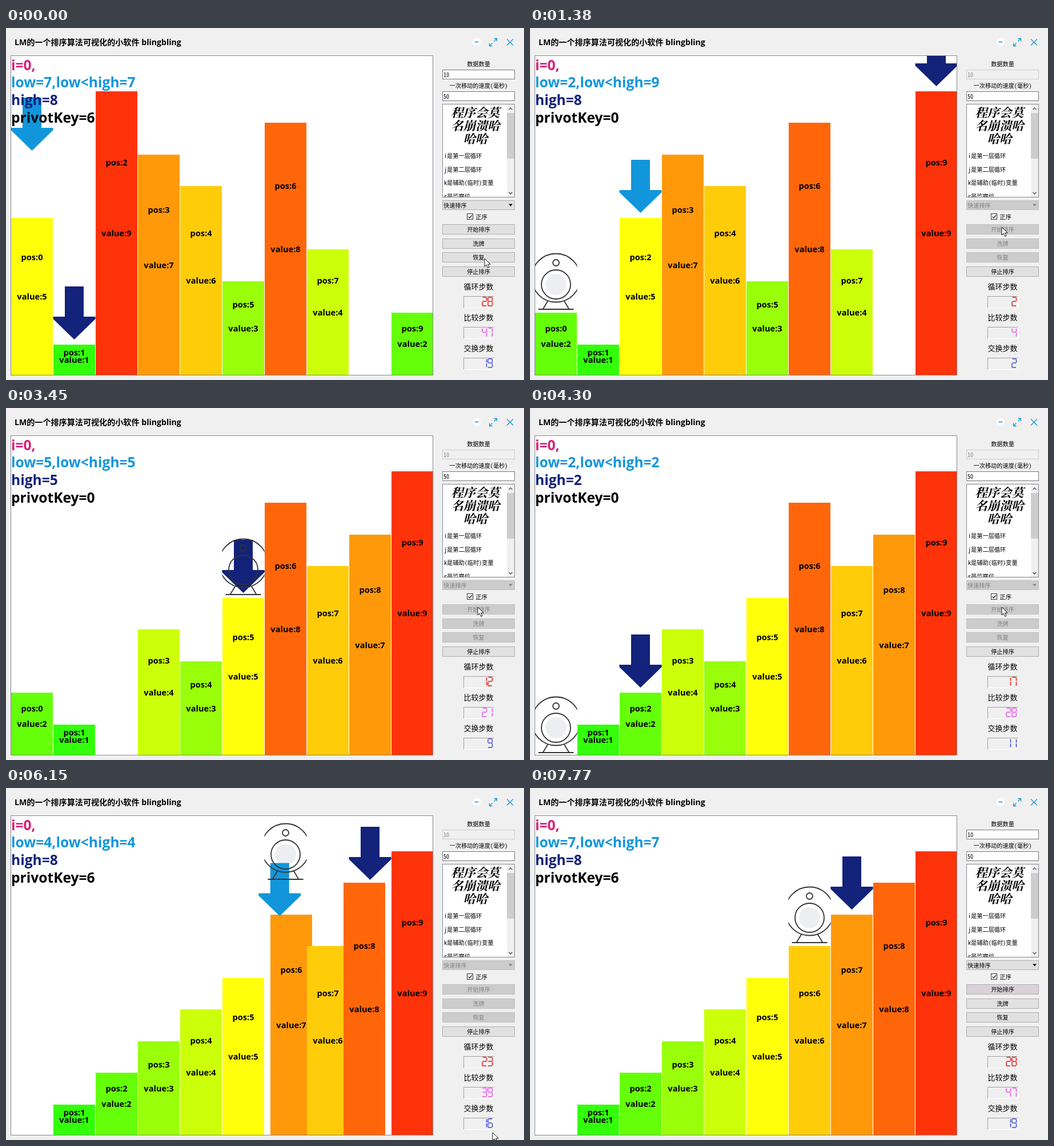
These frames come from a looping animation (907 px wide and 617 px high, 8.23 s). An HTML page:

```html
<!DOCTYPE html>
<html lang="zh">
<head>
<meta charset="utf-8">
<style>
html, body { margin: 0; width: 100%; height: 100%; overflow: hidden; background: #f0f0f0; }
svg { display: block; width: 907px; height: 617px; }
text { white-space: pre; }
.ui { font: 10.2px "Noto Sans Mono CJK SC", "Noto Sans CJK SC", "Noto Sans CJK", sans-serif; }
.big { font: bold 24.6px "Open Sans", "Noto Sans", sans-serif; }
.lab { font: bold 14.6px "Open Sans", "Noto Sans", sans-serif; text-anchor: middle; }
.title { font: bold 14.1px "Open Sans", "Noto Sans CJK SC", "Noto Sans CJK", sans-serif; }
.note { font: italic 600 21.3px "Noto Serif CJK SC", "Noto Sans CJK SC", "Noto Sans CJK", serif; }
.mid { text-anchor: middle; }
.step { font-size: 13px; }
</style>
</head>
<body>
<svg id="stage" viewBox="0 0 907 617"></svg>
<script>
(() => {
const LOOP = 8230, MOVE = 130, START = 600, DONE = 7530, HOVER = 7770;
const DATA = [5, 1, 9, 7, 6, 3, 8, 4, 0, 2];

// time, action, arguments: p pivot, z zero counts, s swap, l low, h high,
// o outer pass, c camera, n extra counts
const STEPS = [
  [START, 'p', 0], [START, 'z'],
  [788, 's', 0, 9], [936, 'l', 1, 9], [1084, 'l', 2, 9], [1232, 's', 2, 9],
  [1385, 'o'], [1385, 'h', 8], [1515, 's', 2, 8], [1700, 'l', 3, 8], [1840, 's', 3, 8],
  [1985, 'o'], [1985, 'h', 7], [2136, 's', 3, 7], [2290, 'l', 4, 7], [2440, 's', 4, 7],
  [2590, 'o'], [2590, 'h', 6], [2735, 'h', 5], [2885, 's', 4, 5], [3165, 'l', 5, 5],
  [3297, 's', 5, 5], [3445, 'c', 5], [3445, 'n', 0, 1],
  [3460, 'p', 0], [3460, 'h', 3], [3605, 'h', 2], [3755, 's', 0, 2],
  [3905, 'l', 1, 2], [4055, 'l', 2, 2], [4290, 's', 2, 2], [4440, 'c', 2],
  [4590, 'p', 0], [4590, 'h', 0], [4740, 's', 0, 0], [4890, 's', 0, 0],
  [5120, 'p', 3], [5284, 's', 3, 4], [5430, 'l', 4, 4], [5580, 's', 4, 4], [5730, 'c', 4],
  [5870, 'p', 6], [5870, 'h', 8], [6030, 's', 6, 8], [6180, 'l', 7, 8], [6330, 'l', 8, 8],
  [6475, 's', 8, 8], [6675, 'c', 8], [6835, 'p', 6], [6835, 'n', 0, 1],
  [6985, 's', 6, 7], [7210, 'l', 7, 7], [7365, 'o']
];

// time, x, y of the pointer tip
const POINTER = [
  [0, 838, 404], [550, 826, 349], [4600, 826, 349], [5000, 858, 430],
  [5380, 847, 516], [6070, 852, 600], [6500, 854, 619], [LOOP, 854, 619]
];

const BLUE = '#1296db', NAVY = '#13227a';

const barX = i => 9 + 74 * i;
const midX = i => 45.5 + 74 * i;
const topOf = v => Math.floor(610.5 - 55.5 * v);
const tipOf = v => topOf(v) - 9;
const lerp = (a, b, k) => a + (b - a) * k;
const tint = v => `rgb(${Math.min(255, 51 * v)},${Math.min(255, 51 * (10 - v))},10)`;
const at = (x, y) => `translate(${x} ${y})`;

const rect = (x, y, w, h, fill, line, more = '') =>
  `<rect x="${x + .5}" y="${y + .5}" width="${w - 1}" height="${h - 1}" fill="${fill}" stroke="${line}" ${more}/>`;
const text = (x, y, s, cls, more = '') => `<text x="${x}" y="${y}" class="${cls}" ${more}>${s}</text>`;
const path = (d, more) => `<path d="${d}" ${more}/>`;

const bar = v => {
  const y = topOf(v), h = 609 - y;
  return `<g id="bar${v}"><rect y="${y}" width="73" height="${h}" fill="${tint(v)}"/>` +
    text(36.5, y + h / 4 + 5, '', 'lab', `id="pos${v}"`) +
    text(36.5, y + h / 2 + 5, 'value:' + v, 'lab') + '</g>';
};
const arrow = (id, fill) =>
  path('M-16.5-93h33v53H37v4L0 0-37-36v-4h20.5z', `id="${id}" fill="${fill}"`);
const button = (id, y, s) =>
  rect(764, y, 127, 18, '#e1e1e1', '#adadad', `id="${id}"`) +
  text(827.5, y + 13, s, 'ui mid', `id="${id}Text"`);
const counter = (id, y, s, color) =>
  text(827.5, y - 12.5, s, 'ui mid step') +
  rect(801, y, 54, 21, '#f0f0f0', '#a0a0a0') +
  path(`M801.5 ${y + 20.5}h53v-20`, 'fill="none" stroke="#fff"') +
  path('', `id="${id}" transform="${at(0, y + 2)}" fill="none" stroke="${color}" stroke-width="1.5"`);

const stage = document.getElementById('stage');
stage.innerHTML = `
<defs>
  <clipPath id="panel"><rect x="8" y="49" width="740" height="560"/></clipPath>
  <clipPath id="cell"><rect x="-37" y="-110" width="74" height="110"/></clipPath>
  <clipPath id="notes"><rect x="765" y="135" width="111" height="161"/></clipPath>
</defs>
<rect width="907" height="617" fill="#f0f0f0"/>` +
text(15, 30, 'LM的一个排序算法可视化的小软件 blingbling', 'title') +
`<circle cx="824" cy="24.5" r="7" fill="#fff"/>` +
path('M820.5 24.5h7M877 19.5l11 11M888 19.5l-11 11M854.5 18.5h5v5M859.5 18.5l-5 5M851.5 31.5h-5v-5M846.5 31.5l5-5',
  `fill="none" stroke="${BLUE}" stroke-width="1.3"`) +
`<rect x="8" y="48" width="740" height="561" fill="#fff"/>
<g clip-path="url(#panel)">` + DATA.filter(v => v > 0).map(bar).join('') +
`<circle id="lens" r="18.5" fill="#edeef2"/>` +
arrow('low', BLUE) + arrow('high', NAVY) +
`<g id="cam" fill="none" stroke="#333" stroke-width="1.8"><g clip-path="url(#cell)">
  <circle cy="-61" r="42.5"/><circle cy="-87.5" r="5.5"/><circle cy="-49.5" r="25.5"/>
  <path d="M-14-21l-9 15M14-21l9 15M-31-6h62"/></g></g>` +
text(9, 73.5, 'i=0,', 'big', 'fill="#d81e74"') +
text(9, 104, '', 'big', `id="lowText" fill="${BLUE}"`) +
text(9, 135, '', 'big', `id="highText" fill="${NAVY}"`) +
text(9, 166, '', 'big', 'id="keyText"') + '</g>' +
rect(8, 48, 740, 561, 'none', '#828790') +
text(827.5, 67, '数据数量', 'ui mid') +
rect(764, 73, 127, 17, '#fff', '#7a7a7a', 'id="count"') +
text(766, 86, '10', 'ui', 'id="countText"') +
text(827.5, 104.5, '一次移动的速度(毫秒)', 'ui mid') +
rect(764, 111, 127, 17, '#fff', '#7a7a7a') + text(766, 123.5, '50', 'ui') +
rect(764, 133, 127, 164, '#fff', '#828790') +
'<g clip-path="url(#notes)">' +
['程序会莫', '名崩溃哈', '哈哈'].map((s, i) => text(822, 156 + 23 * i, s, 'note mid')).join('') +
['i是第一层循环', 'j是第二层循环', 'k是辅助(临时)变量', 'r是监察位']
  .map((s, i) => text(767, 227.7 + 23.8 * i, s, 'ui')).join('') + '</g>' +
`<rect x="877" y="134" width="13" height="162" fill="#f0f0f0"/>
<rect x="877" y="149" width="13" height="80" fill="#cdcdcd"/>` +
path('M880.5 143l3-3 3 3M880.5 288l3 3 3-3', 'fill="none" stroke="#505050" stroke-width="1.3"') +
rect(764, 302, 127, 17, '#e1e1e1', '#adadad', 'id="combo"') +
text(766, 314.5, '快速排序', 'ui', 'id="comboText"') +
path('M880 308.5h7l-3.5 4z', 'id="comboMark"') +
rect(807, 325, 11, 11, '#fff', '#333') +
path('M809.5 330.5l2.3 2.5 4.2-5', 'fill="none" stroke="#222" stroke-width="1.2"') +
text(822.5, 335, '正序', 'ui') +
button('sort', 344, '开始排序') + button('mix', 369, '洗牌') +
button('reset', 393, '恢复') + button('stop', 418, '停止排序') +
counter('loops', 470, '循环步数', '#e8180f') +
counter('compares', 524, '比较步数', '#e650e6') +
counter('swaps', 578, '交换步数', '#4048e0') +
path('M0 0v14l3.2-3 2.4 5.3 2.4-1-2.3-5.2h4.6z', 'id="pointer" fill="#fff" stroke="#000" stroke-width=".9"');

const el = {};
stage.querySelectorAll('[id]').forEach(n => el[n.id] = n);
const set = (id, key, value) => el[id].setAttribute(key, value);
const write = (id, s) => { if (el[id].textContent !== s) el[id].textContent = s; };

// seven segments: start x, start y, stroke
const SEG = {
  a: [1, 0, 'h6.5'], b: [8, .5, 'v6'], c: [8, 8, 'v6.5'], d: [.5, 15, 'h7'],
  e: [.5, 8, 'v6.5'], f: [.5, .5, 'v6'], g: [1, 7.3, 'h6.5']
};
const DIGITS = 'abcdef bc abged abgcd fgbc afgcd afgedc abc abcdefg abcdfg'.split(' ');
const digit = (c, x) => [...DIGITS[c]].map(s => `M${SEG[s][0] + x} ${SEG[s][1]}${SEG[s][2]}`).join('');
const lcd = n => [...String(n)].reverse().map((c, i) => digit(c, 843.5 - 10 * i)).join('');

function stateAt(t) {
  const s = {
    order: [...DATA], seen: [...DATA], x: [], loops: 28, compares: 47, swaps: 19,
    lowText: 'low=7,low<high=7', highText: 'high=8', keyText: 'privotKey=6',
    low: [midX(0), 215], high: [midX(1), 546], cam: -1
  };
  DATA.forEach((v, i) => s.x[v] = barX(i));
  const add = (l, c, w) => { s.loops += l; s.compares += c; s.swaps += w; };
  for (const [t0, act, a, b] of STEPS) {
    if (t < t0) break;
    const k = Math.min(1, (t - t0) / MOVE);
    const point = (who, i) => {
      const [x, y] = s[who];
      s[who] = [lerp(x, midX(i), k), lerp(y, tipOf(s.order[i]), k)];
    };
    if (act === 'p') { add(1, 1, 0); s.cam = a; s.keyText = 'privotKey=' + a; }
    if (act === 'z') s.loops = s.compares = s.swaps = 0;
    if (act === 'o') add(1, 1, 0);
    if (act === 'n') add(a, b, b);
    if (act === 'c') s.cam = a;
    if (act === 'l') { add(1, 1, 0); s.lowText = `low=${a},low<high=${b}`; point('low', a); }
    if (act === 'h') { add(1, 1, 0); s.highText = 'high=' + a; point('high', a); }
    if (act === 's') {
      add(0, 1, 1);
      [s.order[a], s.order[b]] = [s.order[b], s.order[a]];
      for (const i of [a, b]) s.x[s.order[i]] = lerp(s.x[s.order[i]], barX(i), k);
      point('low', a);
      point('high', b);
      if (k === 1) s.seen = [...s.order];
    }
  }
  return s;
}

function pointerAt(t) {
  const i = Math.max(1, POINTER.findIndex(p => p[0] >= t));
  const [t0, x0, y0] = POINTER[i - 1], [t1, x1, y1] = POINTER[i];
  const k = (t - t0) / (t1 - t0);
  return at(Math.round(lerp(x0, x1, k)), Math.round(lerp(y0, y1, k)));
}

function drawForm(t) {
  const off = t >= START && t < DONE, ink = off ? '#838383' : '#000';
  for (const id of ['combo', 'sort', 'mix', 'reset']) {
    set(id, 'fill', off ? '#ccc' : '#e1e1e1');
    set(id, 'stroke', off ? '#bfbfbf' : '#adadad');
    set(id + 'Text', 'fill', ink);
  }
  if (t >= HOVER) set('sort', 'fill', '#d9d0d9');
  set('comboMark', 'fill', ink);
  set('count', 'fill', off ? '#f0f0f0' : '#fff');
  set('count', 'stroke', off ? '#ccc' : '#7a7a7a');
  set('countText', 'fill', ink);
}

function draw(t) {
  const s = stateAt(t);
  s.order.forEach((v, i) => {
    if (!v) return;
    set('bar' + v, 'transform', at(Math.round(s.x[v]), 0));
    write('pos' + v, 'pos:' + i);
  });
  for (const id of ['low', 'high']) set(id, 'transform', at(...s[id]));
  for (const id of ['lowText', 'highText', 'keyText']) write(id, s[id]);
  for (const id of ['loops', 'compares', 'swaps']) set(id, 'd', lcd(s[id]));
  const show = s.cam < 0 ? 'hidden' : 'visible';
  set('cam', 'visibility', show);
  set('lens', 'visibility', show);
  if (s.cam >= 0) {
    const y = topOf(s.seen[s.cam]);
    set('cam', 'transform', at(midX(s.cam), y));
    set('lens', 'transform', at(midX(s.cam), y - 49.5));
  }
  set('pointer', 'transform', pointerAt(t));
  drawForm(t);
}

const begin = performance.now();
function tick() {
  draw(Math.max(0, performance.now() - begin) % LOOP);
  requestAnimationFrame(tick);
}
tick();
})();
</script>
</body>
</html>
```
